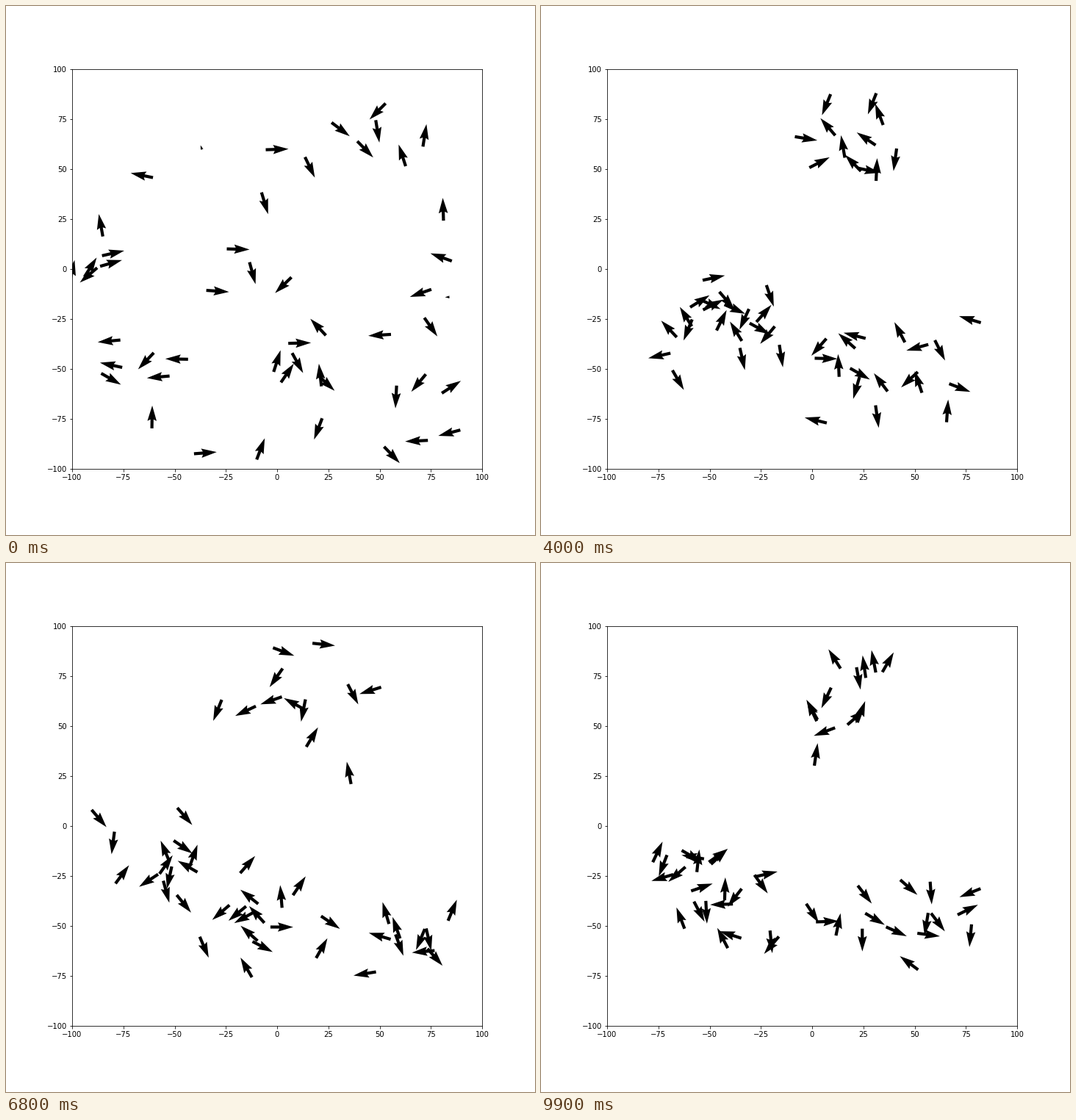
A matplotlib script for the animation above (10 s loop, 720 by 720 pixels).

```python
import numpy as np
import matplotlib.pyplot as plt
from matplotlib.animation import FuncAnimation

FRAMES = 100
SPEED = 2.0

# Where the birds start
START = np.array([
    (49, 79), (31, 70), (49, 69), (72, 67), (61, 57), (43, 60), (0, 60),
    (16, 51), (-6, 33), (-66, 47), (-37, 61), (-86, 22), (81, 30), (80, 6),
    (83, -14), (70, -12), (-19, 10), (-12, -2), (3, -8), (-29, -11),
    (-100, -1), (-91, 1), (-92, -3), (-81, 3), (-80, 8), (-82, -36),
    (-81, -48), (-81, -55), (-64, -46), (-58, -54), (-49, -45), (-61, -74),
    (-35, -92), (-8, -90), (20, -80), (0, -46), (20, -29), (11, -37),
    (10, -47), (5, -52), (21, -53), (24, -57), (50, -33), (75, -29),
    (69, -57), (58, -64), (85, -59), (84, -82), (68, -86), (56, -93),
], dtype=float)
SLOW = [10, 14]  # birds that start almost at rest


def cohesion(pos, upper):
    """Pull towards the round upper flock or the long lower one."""
    x = np.clip(pos[:, 0], -62, 70)
    y = np.interp(x, [-80, -45, 0, 40, 75], [-8, -30, -45, -54, -45])
    low = (np.column_stack([x, y]) - pos) * 0.02
    high = ((18, 62) - pos) * (0.008, 0.014)
    return np.where(upper[:, None], high, low)


def separation(pos, radius=10):
    diff = pos[:, None] - pos[None]
    d2 = (diff ** 2).sum(-1)
    near = (d2 > 0) & (d2 < radius ** 2)
    weight = np.where(near, 1.5 / np.maximum(d2, 1), 0)
    return (diff * weight[..., None]).sum(1)


def fly():
    rng = np.random.default_rng(7)
    pos = START.copy()
    ang = rng.uniform(0, 2 * np.pi, len(pos))
    vel = SPEED * np.column_stack([np.cos(ang), np.sin(ang)])
    vel[SLOW] *= 0.2
    upper = (pos[:, 0] > -40) & (pos[:, 1] > 8)
    track = []
    for _ in range(FRAMES):
        track.append((pos.copy(), vel / SPEED))
        vel = vel + cohesion(pos, upper) + separation(pos)
        vel += rng.normal(0, 0.9, vel.shape)
        vel *= SPEED / np.linalg.norm(vel, axis=1, keepdims=True)
        pos = pos + vel
    return track


track = fly()

fig, ax = plt.subplots(figsize=(10, 10), dpi=72)
fig.subplots_adjust(left=0.125, right=0.9, bottom=0.125, top=0.88)
ax.set(xlim=(-100, 100), ylim=(-100, 100))
pos, vel = track[0]
birds = ax.quiver(*pos.T, *vel.T, scale=18, pivot="mid")


def update(i):
    pos, vel = track[i]
    birds.set_offsets(pos)
    birds.set_UVC(*vel.T)
    return (birds,)


anim = FuncAnimation(fig, update, frames=FRAMES, interval=100,
                     repeat=True, repeat_delay=0)
plt.show()
```
